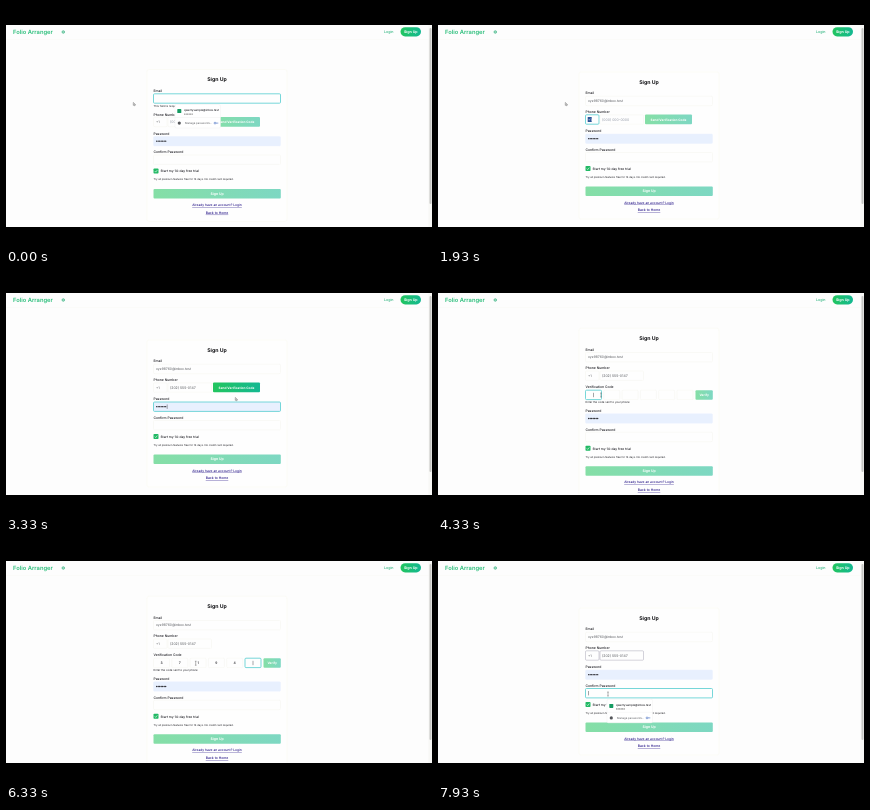
Animation, 426 px wide and 240 px high, one loop 8000 ms. Source, as an HTML page:

```html
<!DOCTYPE html>
<html lang="en">
<head>
<meta charset="utf-8">
<title>Sign up form</title>
<style>
  html, body { margin: 0; width: 100%; height: 100%; overflow: hidden; background: #000; }
  svg { display: block; width: 100%; height: 100%; }
  text { font-family: Inter, Lato, sans-serif; white-space: pre; text-rendering: geometricPrecision; }
  .link { text-decoration: underline; text-decoration-thickness: .3px; }
</style>
</head>
<body>
<svg viewBox="0 0 426 240">
  <defs>
    <linearGradient id="brand"><stop stop-color="#22c55e"/><stop offset="1" stop-color="#14b892"/></linearGradient>
    <clipPath id="page"><rect y="19" width="426" height="202"/></clipPath>
  </defs>
  <g id="scene" clip-path="url(#page)"></g>
</svg>
<script>
const LOOP = 8000, STEP = 200 / 3;
const EMAIL = 'xyz98760@inbox.test', SAVED = 'qwertysample@inbox.test';
const PHONE = '(202) 555-0147', CODE = '371940';
const INK = '#1c1c22', MUTED = '#55575c', FOCUS = '#55cdd0', FAINT = '#f3f3ea', LINK = '#2a1a8a';

// Pointer path: time, x, y, shape
const POINTER = [
  [0, 128, 98, 'arrow'], [2850, 128, 98, 'arrow'], [3270, 230, 125, 'arrow'],
  [3450, 230, 125, 'arrow'], [3680, 231, 114, 'arrow'], [3900, 231, 114, 'arrow'],
  [4250, 163, 121, 'beam'], [6250, 163, 121, 'beam'], [6500, 266, 122, 'arrow'],
  [6750, 266, 122, 'arrow'], [6950, 193, 135, 'beam'], [7050, 193, 135, 'beam'],
  [7400, 170, 152, 'beam'], [LOOP, 170, 152, 'beam']
];

const clamp = v => Math.max(0, Math.min(1, v));
const typed = (text, t, start, end) =>
  text.slice(0, Math.floor(clamp((t - start) / (end - start)) * text.length));

const rect = (x, y, w, h, fill, stroke = 'none', r = 1, line = .4) =>
  `<rect x="${x}" y="${y}" width="${w}" height="${h}" rx="${r}" fill="${fill}" stroke="${stroke}" stroke-width="${line}"/>`;
const label = (x, y, text, size = 3.4, fill = INK, weight = 500, extra = '') =>
  `<text x="${x}" y="${y}" font-size="${size}" fill="${fill}" font-weight="${weight}" ${extra}>${text}</text>`;
const centred = (x, y, text, size, fill, weight, extra = '') =>
  label(x, y, text, size, fill, weight, `text-anchor="middle" ${extra}`);
const line = (x1, y1, x2, y2, stroke, width = .4) =>
  `<path d="M${x1} ${y1}L${x2} ${y2}" stroke="${stroke}" stroke-width="${width}" fill="none"/>`;
const dots = (x, y, n, fill = INK) =>
  Array.from({ length: n }, (_, i) => `<circle cx="${x + i * 1.5}" cy="${y}" r=".65" fill="${fill}"/>`).join('');

function field(x, y, w, focused, fill = '#fefefe', border = FAINT) {
  return rect(x, y, w, 9.4, fill, focused ? FOCUS : border, 1, focused ? .8 : .4);
}

function button(x, y, w, text, enabled, size = 3.2) {
  return `<g opacity="${enabled ? 1 : .55}">${rect(x, y, w, 9.6, 'url(#brand)')}</g>` +
    centred(x + w / 2, y + 6, text, size, '#fff', 700);
}

function savedLogins(y) {
  return rect(169, y, 45.5, 23.5, '#fff', '#ececee', 1.5) +
    rect(171.3, y + 4.6, 4, 4, '#169b62', 'none', .6) +
    label(178, y + 6.4, SAVED, 2.8, INK, 500) + dots(178.7, y + 9.6, 6, '#777') +
    line(169, y + 13, 214.5, y + 13, '#ececee') +
    `<circle cx="173.3" cy="${y + 18.6}" r="1.6" fill="#55565a"/>` +
    label(179, y + 19.8, 'Manage passwords...', 2.7, MUTED, 400) +
    `<circle cx="209" cy="${y + 18.6}" r=".9" fill="none" stroke="#416bc0" stroke-width=".6"/>` +
    line(210, y + 18.6, 212.3, y + 18.6, '#416bc0', .6);
}

function header() {
  return rect(0, 19, 426, 202, '#fdfdfd', 'none', 0) + line(0, 33.5, 423, 33.5, '#f8f8f2') +
    label(7, 27.9, 'Folio Arranger', 5.8, '#27bd78', 600) +
    '<circle cx="57.3" cy="26" r="1.3" fill="#a5dcc4" stroke="#45b98a" stroke-width=".7"/>' +
    label(378, 27.4, 'Login', 3.6, '#27b27a', 500) +
    rect(394.5, 21.2, 20.5, 9.2, 'url(#brand)', 'none', 4.6) +
    centred(404.8, 27.2, 'Sign Up', 3.6, '#fff', 700) +
    rect(422.5, 19, 3.5, 202, '#f8f8f6', 'none', 0) + rect(423.5, 22, 2, 176, '#c6c6c3', 'none', 1);
}

function pointer(t) {
  const i = POINTER.findIndex(p => p[0] > t);
  const a = POINTER[i - 1], b = POINTER[i];
  const u = (t - a[0]) / (b[0] - a[0]), k = u * u * (3 - 2 * u);
  const x = a[1] + (b[1] - a[1]) * k, y = a[2] + (b[2] - a[2]) * k;
  const path = (u > .6 ? b : a)[3] === 'beam'
    ? 'M-.8-2H.8M0-2V2M-.8 2H.8' : 'M-.7-1.5V1.4L.1.7L.7 1.8L1.1 1.6L.6.5H1.5Z';
  return `<path transform="translate(${x} ${y})" d="${path}" fill="#fff" stroke="#555" stroke-width=".45"/>`;
}

function form(t) {
  const error = t < 500, verifying = t >= 3900 && t < 6800, verified = t >= 6800;
  const focus = t < 1700 ? 'email' : t < 2050 ? 'country' : t < 3050 ? 'phone' :
    t < 3900 ? 'password' : verifying ? 'code' : t >= 7400 ? 'confirm' : '';
  const shift = error ? 2.5 : verifying ? 11.8 : 0;
  const top = -shift, mid = error ? shift : -shift, low = shift;
  const blink = t % 1000;
  const caret = (x, y) => blink > 300 && blink < 950 ? line(x, y - 2.2, x, y + 2.2, INK) : '';
  const email = typed(EMAIL, t, 500, 1600), phone = typed(PHONE, t, 2100, 2950);
  const phoneDone = phone.length === PHONE.length;
  const phoneBorder = verified ? '#9391a5' : FAINT;

  let out = rect(141, 66 - shift, 140, 147 + 2 * shift, '#fefefe', '#f6f6ea', 2) +
    centred(211, 77.7 + top, 'Sign Up', 5.2, '#111114', 700) +
    label(147.5, 88.3 + top, 'Email') +
    field(147.5, 90.3 + top, 127, focus === 'email') +
    label(150, 96.2 + top, email, 3.4, MUTED, 400);
  if (focus === 'email' && !email) out += caret(150.3, 95 + top);
  if (error) out += label(147.5, 100.8, 'This field is required', 2.75, INK, 400);

  out += label(147.5, 107 + mid, 'Phone Number') +
    field(147.5, 108.8 + mid, 13.5, focus === 'country', '#fefefe', phoneBorder) +
    field(162, 108.8 + mid, 43.5, focus === 'phone', '#fefefe', phoneBorder);
  if (focus === 'country') out += rect(149.7, 111 + mid, 4, 5, '#2c5497', 'none', 0);
  out += label(150, 114.8 + mid, '+1', 3.3, focus === 'country' ? '#fff' : MUTED, 400) +
    label(164, 114.8 + mid, phone || '(000) 000-0000', 3.5, phone ? MUTED : '#8f96a3', 400);
  if (t < 3900) out += button(207, 108.6 + mid, 47, 'Send Verification Code', phoneDone);

  if (verifying) {
    const digits = typed(CODE, t, 4350, 6420);
    out += label(147.5, 114.3, 'Verification Code');
    for (let i = 0; i < CODE.length; i++) {
      const x = 147.5 + i * 18.3, active = i === Math.min(digits.length, CODE.length - 1);
      out += field(x, 116.2, 16, active) + centred(x + 8, 122.2, digits[i] || '', 3.4, INK, 500);
      if (active && !digits[i]) out += caret(x + 8, 121);
    }
    out += button(257.5, 116.2, 17.3, 'Verify', digits.length === CODE.length) +
      label(147.5, 129, 'Enter the code sent to your phone', 2.75, INK, 400);
  }

  out += label(147.5, 126 + low, 'Password') +
    field(147.5, 128 + low, 127, focus === 'password', '#e8f0fe', '#e8f0fe') + dots(150.7, 132.7 + low, 7);
  if (focus === 'password') out += caret(161.2, 132.7 + low);
  out += label(147.5, 144.8 + low, 'Confirm Password') +
    field(147.5, 146.5 + low, 127, focus === 'confirm');
  if (focus === 'confirm') out += caret(150.5, 151.2 + low);

  out += rect(147.5, 160 + low, 5, 5, '#22b965', 'none', .8) +
    `<path d="M148.8 ${162.6 + low}l.9 1l1.6-2" fill="none" stroke="#fff" stroke-width=".6"/>` +
    label(154.5, 163.7 + low, 'Start my 14-day free trial', 3.25) +
    label(147.5, 171.8 + low, 'Try all premium features free for 14 days. No credit card required.', 2.6, INK, 400) +
    button(147.5, 180.4 + low, 127.3, 'Sign Up', false, 3.5) +
    centred(211, 197.6 + low, 'Already have an account? Login', 3.25, LINK, 500, 'class="link"') +
    centred(211, 205.2 + low, 'Back to Home', 3.4, LINK, 500, 'class="link"');

  if (error) out += savedLogins(98.5);
  if (focus === 'confirm') out += savedLogins(157.3);
  return out;
}

const scene = document.getElementById('scene');
let lastStep = -1;
function frame(now) {
  const step = Math.floor((now % LOOP + 3.5) / STEP) % (LOOP / STEP);
  if (step !== lastStep) {
    const t = step * STEP;
    scene.innerHTML = header() + form(t) + pointer(t);
    lastStep = step;
  }
  requestAnimationFrame(frame);
}
frame(performance.now());
</script>
</body>
</html>
```
